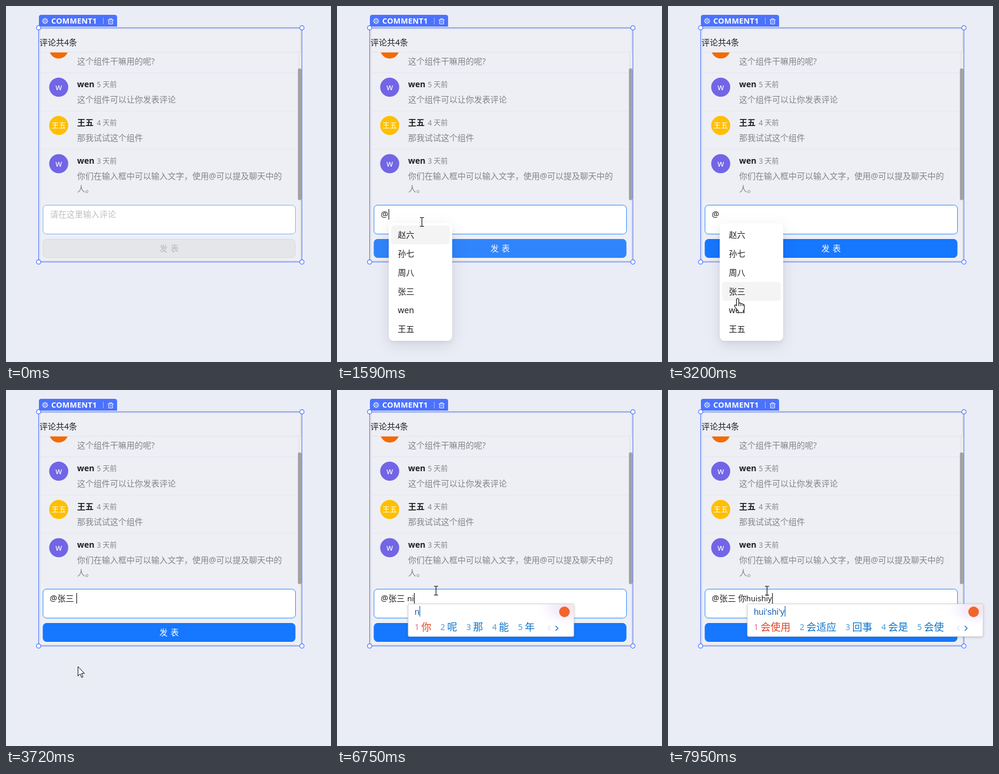
Animation of 553x605 px, one loop 8 s. Source, as an HTML page:

```html
<!DOCTYPE html>
<html lang="zh-CN">
<head>
<meta charset="utf-8">
<style>
html, body { margin: 0; width: 100%; height: 100%; overflow: hidden; background: #eaedf6; }
svg { display: block; }
text { font-family: "Noto Sans", "Noto Sans CJK SC", "Noto Sans CJK", sans-serif; white-space: pre; }
.menu { filter: drop-shadow(0 3px 3px rgba(0,0,0,.05)) drop-shadow(0 7px 12px rgba(0,0,0,.1)); }
.ime { filter: drop-shadow(0 1px 2px rgba(0,0,0,.18)); }
</style>
</head>
<body>
<svg width="553" height="605" viewBox="0 0 553 605">
  <defs>
    <clipPath id="list"><rect x="57" y="79" width="440" height="254"/></clipPath>
    <radialGradient id="glow" cx=".85" cy=".15" r=".9">
      <stop offset="0" stop-color="#fbe3e4"/>
      <stop offset=".45" stop-color="#f3effd"/>
      <stop offset="1" stop-color="#fff" stop-opacity="0"/>
    </radialGradient>
  </defs>
  <g id="base"></g>
  <g id="live"></g>
</svg>
<script>
const BLUE = '#4b72ff', INK = '#1f1f22', GRAY = '#838387';
const $ = id => document.getElementById(id);

const text = (x, y, s, fill = INK, size = 14, more = '') =>
  `<text x="${x}" y="${y}" fill="${fill}" font-size="${size}" ${more}>${s}</text>`;
const rect = (x, y, w, h, fill, more = '') =>
  `<rect x="${x}" y="${y}" width="${w}" height="${h}" fill="${fill}" ${more}/>`;
const circle = (x, y, r, fill, more = '') =>
  `<circle cx="${x}" cy="${y}" r="${r}" fill="${fill}" ${more}/>`;
const path = (d, stroke, width = 1, fill = 'none') =>
  `<path d="${d}" stroke="${stroke}" stroke-width="${width}" fill="${fill}" stroke-linejoin="round"/>`;

const clamp = v => Math.min(1, Math.max(0, v));
const mix = (a, b, k) => `rgb(${a.map((v, i) => Math.round(v + (b[i] - v) * k))})`;
const last = (rows, t) => rows.filter(r => r[0] <= t).pop();

function comment(y, name, days, color, lines) {
  const mark = name === '王五' ? name : name[0];
  const size = mark.length > 1 ? 12.5 : 14;
  return path(`M57 ${y - 24.5}H497`, '#e5e6ea') +
    circle(89.7, y, 16.2, color) +
    text(89.7, y + 5, mark, '#fff', size, 'text-anchor="middle"') +
    text(121, y, name, INK, 14, 'font-weight="600"') +
    text(154.5, y, days + ' 天前', GRAY, 12, 'font-weight="500"') +
    lines.map((s, i) => text(121, y + 26 + 22 * i, s, GRAY)).join('');
}

function base() {
  const corners = [[55.5, 37], [503.5, 37], [55.5, 435], [503.5, 435]];
  const spokes = [0, 1, 2, 3, 4, 5, 6, 7].map(i => {
    const c = Math.cos(i * Math.PI / 4), s = Math.sin(i * Math.PI / 4);
    return `M${66.5 + 3.6 * c} ${25.5 + 3.6 * s}l${1.4 * c} ${1.4 * s}`;
  }).join('');
  return rect(56, 37, 447, 398, '#eeeff5') +
    rect(57.5, 38.5, 444, 395, 'none', 'stroke="#cdd0da"') +
    rect(55.5, 37, 448, 398, 'none', `stroke="${BLUE}"`) +
    path('M56 35V19q0-4 4-4H185q4 0 4 4V35z', 'none', 0, BLUE) +
    circle(66.5, 25.5, 3.7, 'none', 'stroke="#fff"') + circle(66.5, 25.5, 1.4, 'none', 'stroke="#fff" stroke-width=".8"') +
    path(spokes, '#fff', 1.3) +
    text(77, 30, 'COMMENT1', '#fff', 13, 'font-weight="700" letter-spacing=".25"') +
    path('M165.5 20V31', '#a9bcff') +
    path('M173 23.5H183M176 23.5V21.5H180V23.5M174.5 23.5V30.5H181.5V23.5M176.8 25.5V28.5M179.2 25.5V28.5', '#fff', .9) +
    text(57, 67, '评论共4条') + path('M57 78.5H501', '#e2e3e8') +
    `<g clip-path="url(#list)">` +
    comment(73, '王五', 5, '#f56a00', ['这个组件干嘛用的呢?']) +
    comment(138, 'wen', 5, '#7265e6', ['这个组件可以让你发表评论']) +
    comment(203, '王五', 4, '#ffbf00', ['那我试试这个组件']) +
    comment(268, 'wen', 3, '#7265e6', ['你们在输入框中可以输入文字，使用@可以提及聊天中的', '人。']) +
    '</g>' +
    rect(497, 79, 5, 251, '#e8e9ec') + rect(496.7, 106, 6, 224, '#9fa1a4', 'rx="3"') +
    corners.map(([x, y]) => circle(x, y, 3.7, '#fff', `stroke="${BLUE}" stroke-width="1.2"`)).join('');
}

// time, committed text, composed letters
const typed = [
  [0, '', ''], [490, '@', ''], [3620, '@张三 ', ''], [6250, '@张三 ', 'n'], [6750, '@张三 ', 'ni'],
  [7160, '@张三 你', ''], [7260, '@张三 你', 'h'], [7360, '@张三 你', 'hu'], [7450, '@张三 你', 'hui'],
  [7650, '@张三 你', 'huis'], [7750, '@张三 你', 'huish'], [7850, '@张三 你', 'huishi'], [7950, '@张三 你', 'huishiy']
];
const ends = { '': 75, '@': 87.5, '@张三 ': 119.5, '@张三 你': 133 };
const letters = { n: 8, i: 3.4, h: 8, u: 8, s: 6.2, y: 7 };

// time, left edge, letters, candidates
const FACE = '\\(^o^)/~', HAND = 'ok';
const ime = [
  [0], [6340, 121, 'n', '你 呢 那 能 年'], [6870, 121, 'ni', '你 呢 那 能 年'], [7160],
  [7260, 135, 'h', `好 ${HAND} 黄 汉 ${FACE}`], [7360, 135, 'hu', '湖 胡 护 户 虎'],
  [7450, 135, 'hui', '会 回 挥 灰 辉'], [7650, 135, "hui's", '会死 回收 会所 回丝 会思'],
  [7750, 135, "hui'sh", '会是 会使 回事 会上 回收'], [7850, 135, "hui'shi", '会是 回事 会使 会试 会士'],
  [7950, 135, "hui'shi'y", '会使用 会适应 回事 会是 会使']
];
const spans = { [FACE]: 75, [HAND]: 29 };

function imeBox([, left, keys, words]) {
  if (!left) return '';
  let x = left + 11, row = '', end = 0;
  words.split(' ').forEach((w, i) => {
    const color = i ? '#0b74c9' : '#e8401f';
    row += text(x, 408, i + 1, i ? '#4b9bd8' : '#f2668c', 14);
    if (w === HAND) {
      row += circle(x + 20, 406, 4, 'none', 'stroke="#fbe9d6" stroke-width="2.5"') +
        path(`M${x + 21} 402v-7M${x + 24} 403l1-6M${x + 26} 406l2-5`, '#fbe9d6', 2.2) +
        path(`M${x + 33} 410h8l-4 4z`, 'none', 0, '#69a9dc');
    } else {
      row += text(x + 11.5, 409, w, color, 17, w === FACE ? 'letter-spacing="1.6"' : '');
    }
    end = x + 12 + (spans[w] || 17 * w.length);
    x = end + 15;
  });
  const right = end + 66, caret = keys === 'h' ? '#e8401f' : '#1d6bc0';
  const width = [...keys].reduce((n, c) => n + ({ i: 3.35, "'": 2.9, s: 7.5, y: 7.5 }[c] || 8.4), 0);
  return `<g class="ime">${rect(left, 363.5, right - left, 55.5, '#fff', 'rx="2" stroke="#c9ccd4" stroke-width=".8"')}</g>` +
    rect(right - 64, 364, 63.5, 40, 'url(#glow)') + row +
    text(left + 11, 382, keys, '#1d62b5', 15, 'style="font-family:\'Liberation Sans\',sans-serif"') +
    path(`M${left + 11.5 + width} 367V385`, caret, 1.2) +
    circle(right - 16, 377, 9, '#f0642d') +
    path(`M${end + 26} 401l-4 4 4 4`, '#cfe2f2', 1.2) + path(`M${end + 35} 401l4 4-4 4`, '#0b74c9', 1.4);
}

function menu(t) {
  if (t < 490 || t >= 3720) return '';
  const show = t < 590 ? .3 : t < 690 ? .8 : t < 3620 ? 1 : .35;
  const pick = t < 2810 ? 0 : t < 2900 ? 1 : t < 3010 ? 2 : 3;
  const grow = .8 + .2 * show;
  return `<g class="menu" opacity="${show}" transform="translate(0 ${369 * (1 - grow)}) scale(1 ${grow})">` +
    rect(88, 369, 108, 200, '#fff', 'rx="8"') +
    rect(92, 373 + 32 * pick, 100, 32, '#f4f4f4', 'rx="5"') +
    ['赵六', '孙七', '周八', '张三', 'wen', '王五'].map((s, i) => text(103.5, 394 + 32 * i, s)).join('') + '</g>';
}

const shapes = {
  beam: path('M-3.5-7.5H-1Q0-7.5 0-6.5Q0-7.5 1-7.5H3.5M0-6.5V6.5M-3.5 7.5H-1Q0 7.5 0 6.5Q0 7.5 1 7.5H3.5', '#111', 1.1),
  hand: path('M-2 2a2 2 0 0 1 4 0v6q3-1 3.5 1q3-.8 3.5 1q2.5 0 2.5 2.5v4q0 2.5-2 5v2.5h-8v-2q-2-3-6-7.5q-2-3 .5-3.5q1.5 0 2 1.5zM5.5 9v4M9 10v3M2 8v5', '#111', 1.1, '#fff'),
  arrow: path('M0 0v16l3.7-3.5 2.5 6 2.3-1-2.5-5.8h5z', '#111', 1, '#fff')
};
const moves = [
  [900, 'arrow', 150, 195], [990, 'beam', 144.5, 367], [2600, 'hand', 141, 380], [2810, 'hand', 136, 412],
  [2900, 'hand', 128, 450], [3010, 'hand', 121, 484], [3100, 'hand', 118.5, 497], [3620, 'arrow', 122.5, 470],
  [3820, 'arrow', 146, 410], [3920, 'beam', 163, 360], [4030, 'beam', 168.5, 341]
];
const blinks = [100, 990, 1500, 2010, 2510, 3010, 3510, 4240, 4740, 5350, 5840];

function live(t) {
  const [, done, keys] = last(typed, t);
  const focus = clamp(Math.floor(t / 100) / 3);
  const on = t < 490 ? 0 : t < 590 ? .5 : t < 1710 ? .87 : 1;
  const start = ends[done];
  const caret = [...keys].reduce((x, c) => x + letters[c], start) + (done ? .7 : 0);
  const move = last(moves, t);
  let out = rect(61.5, 337, 432.5, 52, `rgba(5,145,255,${.1 * focus})`, 'rx="7.5"') +
    rect(63, 338.5, 429.5, 49, '#fff', `rx="6" stroke="${mix([122, 180, 248], [64, 150, 255], focus)}"`);
  if (!done) out += text(75, 359, '请在这里输入评论', '#bfbfbf');
  if (done) out += text(74.5, 359, '@');
  if (done.length > 1) out += text(87.5, 359, '张三');
  if (done.length > 4) out += text(119.3, 359, '你');
  out += text(start, 359, keys, INK, 13);
  if (blinks.filter(b => b <= t).length % 2) out += path(`M${caret} 345V363`, '#111', 1.1);

  const fill = mix([229, 230, 234], [22, 119, 255], on);
  const edge = mix([217, 217, 219], [22, 119, 255], on);
  out += rect(63, 396.5, 429, 31, fill, `rx="6" stroke="${edge}"`) +
    text('261 280', 417, '发表', mix([184, 184, 188], [255, 255, 255], on));
  out += menu(t) + imeBox(last(ime, t));
  if (move) out += `<g transform="translate(${move[2]} ${move[3]})">${shapes[move[1]]}</g>`;
  return out;
}

$('base').innerHTML = base();
let shown;
function frame(now) {
  const next = live(now % 8000);
  if (next !== shown) $('live').innerHTML = shown = next;
  requestAnimationFrame(frame);
}
frame(0);
</script>
</body>
</html>
```
